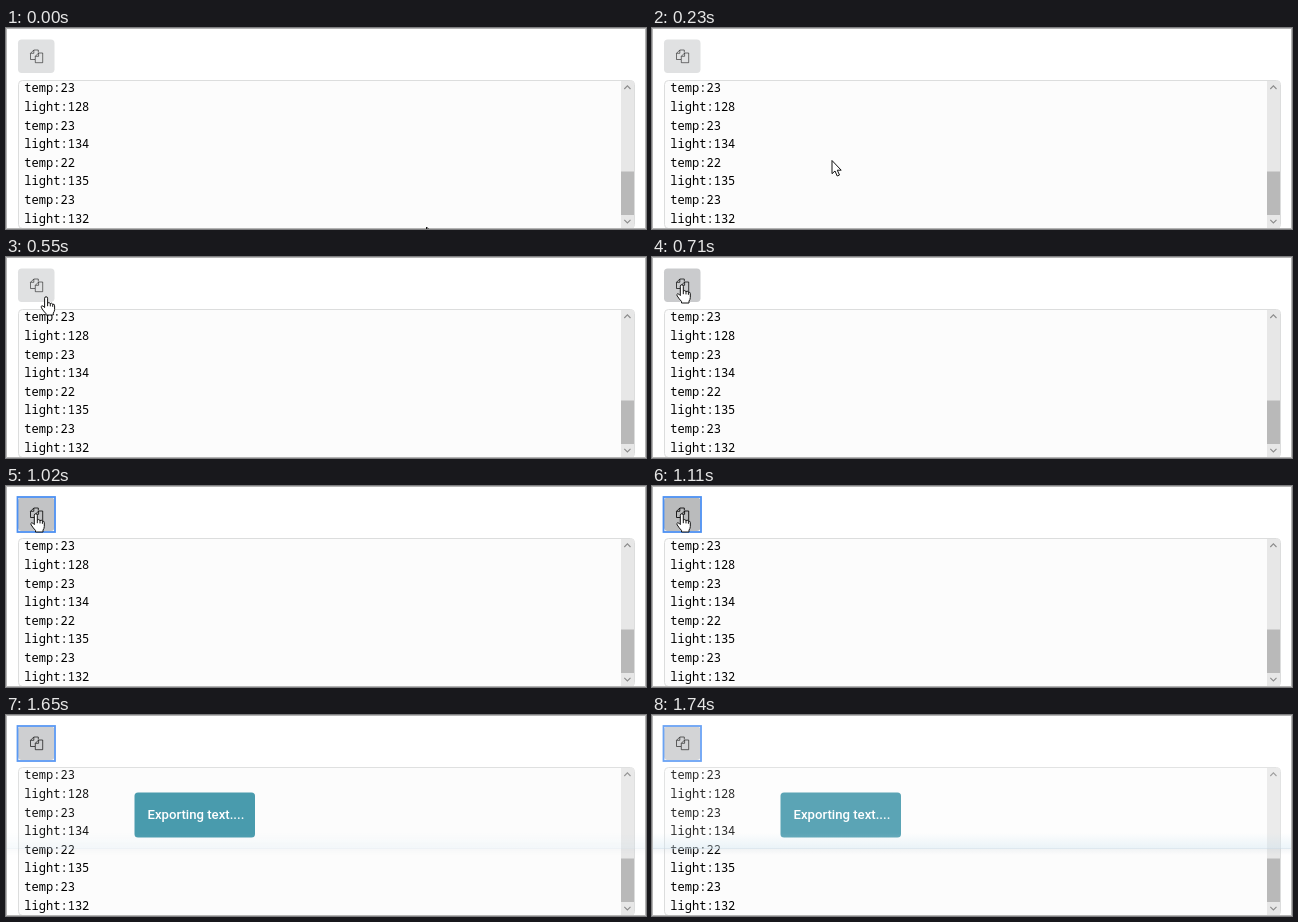
An HTML page that plays this animation: 640x201 px, repeating every 1.81 s.

```html
<!DOCTYPE html>
<html lang="en">
<head>
<meta charset="utf-8">
<title>Export button</title>
<style>
  html, body { margin: 0; width: 100%; height: 100%; overflow: hidden; background: #fff; }
  svg { display: block; width: 640px; height: 201px; }
  .log { font: 12.06px "Noto Sans Mono", monospace; fill: #000; }
  .toast { font: 500 13.16px Roboto, sans-serif; fill: #fff; }
</style>
</head>
<body>
<svg viewBox="0 0 640 201" xmlns="http://www.w3.org/2000/svg">
  <defs>
    <linearGradient id="glow" x1="0" y1="0" x2="0" y2="1">
      <stop offset="0" stop-color="#bfdcec" stop-opacity="0"/>
      <stop offset="1" stop-color="#bfdcec" stop-opacity=".3"/>
    </linearGradient>
    <linearGradient id="shade" x1="0" y1="0" x2="0" y2="1">
      <stop offset="0" stop-color="#9fb4c2" stop-opacity=".12"/>
      <stop offset="1" stop-color="#9fb4c2" stop-opacity="0"/>
    </linearGradient>
  </defs>
  <rect width="640" height="201" fill="#fff"/>

  <!-- button -->
  <rect id="button" x="12" y="11.5" width="36.5" height="33.5" rx="3.7"/>
  <rect id="focus" x="11.5" y="11" width="37.5" height="35" fill="none" stroke="#4c90f2" stroke-width="1.8"/>
  <g id="icon" fill="none" stroke="#000" stroke-width="1" stroke-linejoin="round">
    <path d="M29 31.5H24.5V25.3L27.8 22H32.3V24.5M24.5 25.3H27.8V22"/>
    <path d="M29.3 28.3L32.6 25H36.7V34.7H29.3ZM29.3 28.3H32.6V25"/>
  </g>

  <!-- text area -->
  <rect x="12.5" y="52.5" width="616" height="148" rx="4" fill="#fcfcfc" stroke="#dcdddd"/>
  <rect x="615" y="53" width="13" height="147" fill="#e7e7e7"/>
  <rect x="615" y="143.5" width="13" height="43.5" fill="#b9b9b9"/>
  <g fill="none" stroke="#8b8b8b" stroke-width="1.1">
    <path d="M618.3 61L621.4 57.9L624.5 61"/>
    <path d="M618.3 191.8L621.4 194.9L624.5 191.8"/>
  </g>
  <g id="log" class="log"></g>
  <rect x=".5" y=".5" width="639" height="200" fill="none" stroke="#b4b4b4"/>

  <g id="toast">
    <rect x="128.5" y="77.5" width="120.5" height="45" rx="3.5" fill="#3a92a6"/>
    <text class="toast" x="141.5" y="104.3">Exporting text....</text>
  </g>

  <!-- sheet fading in over the upper part -->
  <g id="sheet">
    <rect x="1" y="1" width="638" height="133" fill="#fff" id="veil"/>
    <g id="edge">
      <rect x="1" y="118" width="638" height="15" fill="url(#glow)"/>
      <rect x="1" y="133" width="638" height="1" fill="#bfd3e2" opacity=".5"/>
      <rect x="1" y="134" width="638" height="6" fill="url(#shade)"/>
    </g>
  </g>

  <g fill="#fff" stroke="#111" stroke-width="1" stroke-linejoin="round">
    <path id="arrow" d="M0 0V13.2L3 10.5L5.2 15.5L7.5 14.5L5.3 9.7H9.2Z"/>
    <path id="hand" d="M-1.7 10.6V1.2Q-1.7 -.2 -.2 -.2Q1.3 -.2 1.3 1.2V6
      Q2.8 4.9 4 6.5Q5.6 5.6 6.4 7.2Q8.3 6.7 8.3 8.8V12.5Q8.2 14.6 7 16.1V18H-.5V16.4
      Q-2.7 14.3 -4.8 10.9Q-5.7 9.2 -4.4 8.8Q-3.3 8.5 -1.7 10.6Z
      M1.3 6V9.2M4 6.5V9.4M6.4 7.2V9.8"/>
  </g>
</svg>
<script>
const LOOP = 1810;
const $ = id => document.getElementById(id);
const REST = 0, HOVER = 1, ACTIVE = 2;
const shades = [[224, 225, 226], [202, 203, 205], [186, 187, 188]];
const iconAlpha = [.52, .72, .85];

const readings = [23, 128, 23, 134, 22, 135, 23, 132];
$("log").innerHTML = readings.map((value, i) =>
  `<text x="18.3" y="${64.2 + i * 18.65}">${i % 2 ? "light" : "temp"}:${value}</text>`).join("");

// Screen capture: each state holds until the next one begins.
const base = { x: 30, y: 28, pointer: "hand", level: REST, focus: false, toast: false, veil: 0 };
const move = (at, x, y) => ({ at, x, y, pointer: "arrow" });
const done = { level: HOVER, focus: true, toast: true };
const states = [
  move(0, 420.5, 199),
  move(60, 352, 182),
  move(150, 260, 158),
  move(230, 180, 132.5),
  move(310, 128, 106),
  move(390, 90, 81),
  move(470, 60, 58),
  { at: 550, x: 40.3, y: 40 },
  { at: 620, x: 32, y: 31, level: .5 },
  { at: 710, level: HOVER },
  { at: 1020, level: 1.5, focus: true },
  { at: 1110, level: ACTIVE, focus: true },
  { at: 1570, ...done },
  { at: 1650, ...done, pointer: "none", veil: .08 },
  { at: 1740, ...done, pointer: "none", veil: .167 }
].map(state => ({ ...base, ...state }));

const mix = (a, b, k) => a + (b - a) * k;
const show = (id, on) => $(id).setAttribute("visibility", on ? "visible" : "hidden");

function draw(time) {
  const s = states.filter(state => state.at <= time).pop();
  const low = Math.min(Math.floor(s.level), 1), k = s.level - low;
  const color = shades[low].map((c, i) => Math.round(mix(c, shades[low + 1][i], k)));
  $("button").setAttribute("fill", `rgb(${color})`);
  $("icon").setAttribute("stroke-opacity", mix(iconAlpha[low], iconAlpha[low + 1], k));
  show("focus", s.focus);
  show("toast", s.toast);
  show("sheet", s.veil > 0);
  $("veil").setAttribute("opacity", s.veil);
  $("edge").setAttribute("opacity", s.veil / .167);
  for (const id of ["arrow", "hand"]) {
    show(id, s.pointer === id);
    $(id).setAttribute("transform", `translate(${s.x} ${s.y})`);
  }
}

const start = performance.now();
function tick() {
  draw((performance.now() - start) % LOOP);
  requestAnimationFrame(tick);
}
tick();
</script>
</body>
</html>
```
